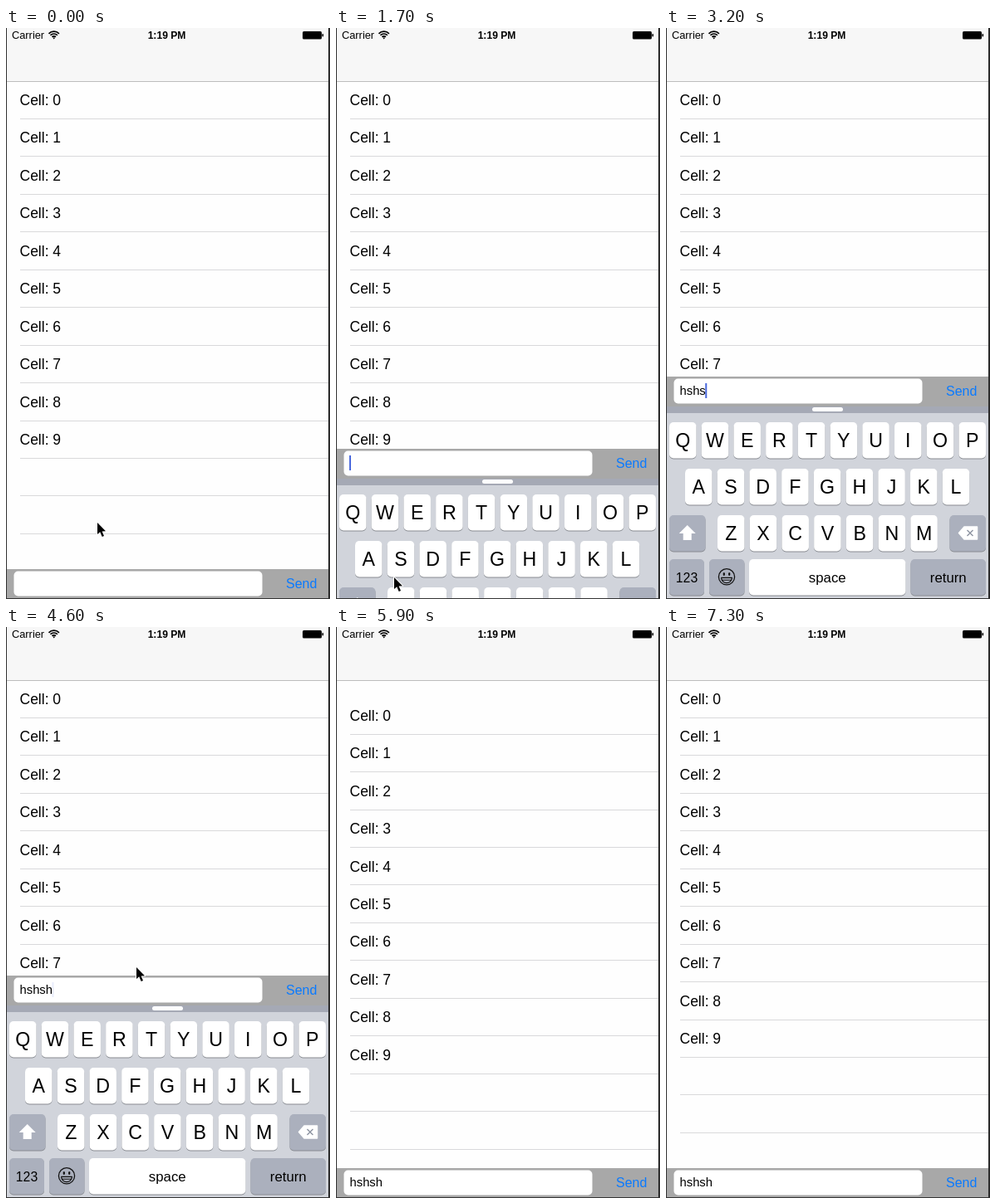
Write an HTML page with a canvas that moves like this. It is 390 by 688 pixels and loops after 7800 ms.

```html
<!DOCTYPE html>
<html lang="en">
<head>
<meta charset="utf-8">
<title>Keyboard input bar</title>
<style>
  html, body { margin: 0; width: 100%; height: 100%; overflow: hidden; background: #fff; }
  canvas { display: block; }
</style>
</head>
<body>
<canvas id="stage" width="390" height="688"></canvas>
<script>
const ctx = document.getElementById('stage').getContext('2d');
const LOOP = 7800, STEP = 100;
const BAR_CLOSED = 652, BAR_OPEN = 420, TRAVEL = BAR_CLOSED - BAR_OPEN;
const RELEASE = 5600;
const TYPED_AT = [2600, 2800, 3000, 3100, 3300];

// Remaining distance of a critically damped spring, 1 at rest start, 0 at the end.
const springLeft = (ms, rate) => {
  const x = Math.max(0, ms) / 1000 * rate;
  return (1 + x) * Math.exp(-x);
};

// Linear interpolation through [time, ...values] keys.
function tween(t, keys) {
  const next = keys.findIndex(k => k[0] > t);
  if (next === 0) return keys[0].slice(1);
  if (next < 0) return keys[keys.length - 1].slice(1);
  const a = keys[next - 1], b = keys[next];
  const p = (t - a[0]) / (b[0] - a[0]);
  return a.slice(1).map((v, i) => v + (b[i + 1] - v) * p);
}

const fingerY = t => 410 + 214 * Math.max(0, (t - 5040) / 460) ** 2.5;
// The app reacts to the finger 100 ms late.
const dragged = t => Math.max(0, fingerY(Math.min(t, RELEASE) - 100) - BAR_OPEN);

function barTop(t) {
  if (t < 4800) return BAR_OPEN + TRAVEL * springLeft(t - 1584, 18.26);
  const left = TRAVEL - dragged(t);
  return BAR_CLOSED - left * (t < RELEASE ? 1 : springLeft(t - RELEASE, 32));
}

function overscroll(t) {
  const pull = dragged(t) * 0.55;
  return pull / (1 + pull / 688) * springLeft(t - RELEASE, 9.87);
}

function pointer(t) {
  if (t < 2600) return tween(t, [[0, 110, 596], [200, 103, 610], [400, 80, 652], [600, 70, 662]]);
  if (t >= 4400 && t < 4800) return tween(t, [[4400, 150, 438], [4500, 155, 420], [4600, 157, 410]]);
  if (t >= 4800 && t < RELEASE) return [157, fingerY(t)];
  if (t >= 6400 && t < 7300) return tween(t, [
    [6400, 322, 667], [6500, 320, 540], [6600, 314, 392], [6700, 308, 309], [6800, 306, 327],
    [7000, 306, 327], [7100, 318, 290], [7200, 347, 192]]);
  return null;
}

const caretAlpha = t => t < 1600 || t >= RELEASE ? 0 : t >= 2600 && t < 3400 ? 1 : tween(t, [
  [2100, 1], [2400, 0], [2500, 0], [3300, 1], [3600, 0], [3700, 0], [4000, 1],
  [4300, 1], [4600, 0.12], [4700, 0.12], [5000, 1]])[0];

function rect(x, y, w, h, color) {
  ctx.fillStyle = color;
  ctx.fillRect(x, y, w, h);
}

function round(x, y, w, h, r, color) {
  ctx.fillStyle = color;
  ctx.beginPath();
  ctx.roundRect(x, y, w, h, r);
  ctx.fill();
}

function text(str, x, y, size, { align = 'left', color = '#000', weight = '' } = {}) {
  ctx.font = `${weight} ${size}px "Liberation Sans", Arial, sans-serif`;
  ctx.textAlign = align;
  ctx.fillStyle = color;
  ctx.fillText(str, x, y);
}

function shape(points, fill, stroke, width = 1) {
  ctx.beginPath();
  points.forEach(([x, y]) => ctx.lineTo(x, y));
  ctx.closePath();
  ctx.lineWidth = width;
  ctx.lineJoin = 'round';
  if (stroke) { ctx.strokeStyle = stroke; ctx.stroke(); }
  ctx.fillStyle = fill;
  ctx.fill();
}

function arc(x, y, r, from, to, width, color) {
  ctx.beginPath();
  ctx.arc(x, y, r, from, to);
  ctx.lineWidth = width;
  ctx.strokeStyle = color;
  ctx.stroke();
}

function drawTable(shift) {
  rect(0, 0, 390, 688, '#fefefe');
  for (let i = 0; i < 13; i++) {
    rect(17, Math.floor(109.4 + 45.45 * i + shift), 371, 1, '#d9d9db');
    if (i < 10) text('Cell: ' + i, 16.5, Math.round(93 + 45.45 * i + shift), 17.5);
  }
}

function drawHeader() {
  rect(0, 0, 390, 64, '#f7f7f7');
  rect(0, 64, 390, 1, '#bdbdbd');
  text('Carrier', 7, 13, 12.8);
  for (const r of [3.2, 6, 8.8]) arc(57.7, 13, r, -Math.PI * 0.75, -Math.PI * 0.25, 1.7, '#000');
  shape([[56, 11.5], [59.4, 11.5], [57.7, 13.4]], '#000');
  text('1:19 PM', 193.5, 13, 12.1, { align: 'center', weight: 'bold' });
  round(357, 4, 23, 9.5, 1.5, '#000');
  round(380.5, 7, 1.6, 3.5, 0.8, '#000');
}

function drawKey(x, y, w, label, size, color = '#fff') {
  round(x, y + 1, w, 43.5, 5, '#898c92');
  round(x, y, w, 43.5, 5, color);
  if (label) text(label, x + w / 2, y + 22 + size * 0.35, size, { align: 'center' });
}

function drawEmoji(x, y) {
  arc(x, y, 9.6, 0, 7, 1.3, '#111');
  for (const side of [-1, 1]) {
    ctx.fillStyle = '#111';
    ctx.beginPath();
    ctx.ellipse(x + side * 3.2, y - 3.2, 1.2, 2, 0, 0, 7);
    ctx.fill();
  }
  ctx.beginPath();
  ctx.arc(x, y + 1, 6.4, 0, Math.PI);
  ctx.closePath();
  ctx.lineWidth = 1.2;
  ctx.strokeStyle = '#111';
  ctx.stroke();
  rect(x - 5, y + 3.4, 10, 1, '#111');
}

function drawKeyboard(top, hasText) {
  const dark = '#abb0bd';
  rect(0, top + 35, 390, 300, '#d1d4db');
  rect(0, top + 35, 390, 9, '#a5a9b5');
  round(176, top + 37, 37, 5, 2.5, '#fff');
  ['QWERTYUIOP', 'ASDFGHJKL', 'ZXCVBNM'].forEach((letters, row) => {
    const left = [4, 23, 62][row];
    [...letters].forEach((c, i) => drawKey(left + 38.72 * i, top + 55 + 56 * row, 32.5, c, 23.2));
  });

  const third = top + 167, bottom = top + 220;
  drawKey(4, third, 43.5, '', 0, dark);
  drawKey(341.5, third, 43.5, '', 0, dark);
  const arrow = [[0, -10], [10, 0], [5, 0], [5, 8], [-5, 8], [-5, 0], [-10, 0]];
  shape(arrow.map(([x, y]) => [25.7 + x, third + 22 + y]), '#fff');

  const cy = third + 21.5;
  shape([[352.5, cy], [359, cy - 7.5], [374.5, cy - 7.5], [374.5, cy + 7.5], [359, cy + 7.5]],
    hasText ? '#fff' : '#c6cad3', hasText ? '#fff' : '#e6e8ec', 1.5);
  ctx.strokeStyle = hasText ? '#8d93a1' : '#eef0f3';
  ctx.lineWidth = 1.4;
  ctx.beginPath();
  for (const s of [-1, 1]) {
    ctx.moveTo(362.5, cy - 3.5 * s);
    ctx.lineTo(369.5, cy + 3.5 * s);
  }
  ctx.stroke();

  drawKey(4, bottom, 42, '123', 15.8, dark);
  drawKey(52, bottom, 42.5, '', 0, dark);
  drawEmoji(73, bottom + 21.3);
  drawKey(100, bottom, 188.5, 'space', 16.8);
  drawKey(294.5, bottom, 90.5, 'return', 16.8, dark);
}

function drawBar(top, typed, caret) {
  rect(0, top, 390, 36, '#a8a8a8');
  round(9.5, top + 2.5, 299, 30, 5, '#fff');
  text(typed, 16.5, top + 22, 14.8);
  text('Send', 337, top + 23, 16, { color: '#0a7aff' });
  if (caret > 0) {
    ctx.globalAlpha = caret;
    rect(16 + ctx_width(typed), top + 8, 2, 18, '#4a69dd');
    ctx.globalAlpha = 1;
  }
}

function ctx_width(str) {
  ctx.font = '14.8px "Liberation Sans", Arial, sans-serif';
  return ctx.measureText(str).width;
}

function drawPointer(t) {
  const tip = pointer(t);
  if (!tip) return;
  const [x, y] = tip;
  const pressed = (t >= 1400 && t < 1600) || t >= 4800 && t < RELEASE;
  if (pressed) arc(x + 1, y + 2, 23.3, 0, 7, 1.5, '#111');
  const arrow = [[0, 0], [0, 14], [3.2, 11.2], [5.7, 17], [8, 16], [5.6, 10.4], [10, 10.2]];
  shape(arrow.map(([dx, dy]) => [x + dx, y + dy]), '#000', '#fff', 2);
}

function drawFrame(t) {
  const top = Math.round(barTop(t));
  const typed = 'hshsh'.slice(0, TYPED_AT.filter(at => at <= t).length);
  drawTable(overscroll(t));
  drawHeader();
  drawKeyboard(top, typed !== '');
  drawBar(top, typed, caretAlpha(t));
  drawPointer(t);
  rect(0, 0, 1, 688, '#333');
  rect(388, 0, 2, 688, '#2b2b2b');
  rect(0, 687, 390, 1, '#333');
}

const start = performance.now();
function tick() {
  const t = (performance.now() - start) % LOOP;
  drawFrame(Math.floor(t / STEP) * STEP);
  requestAnimationFrame(tick);
}
tick();
</script>
</body>
</html>
```
